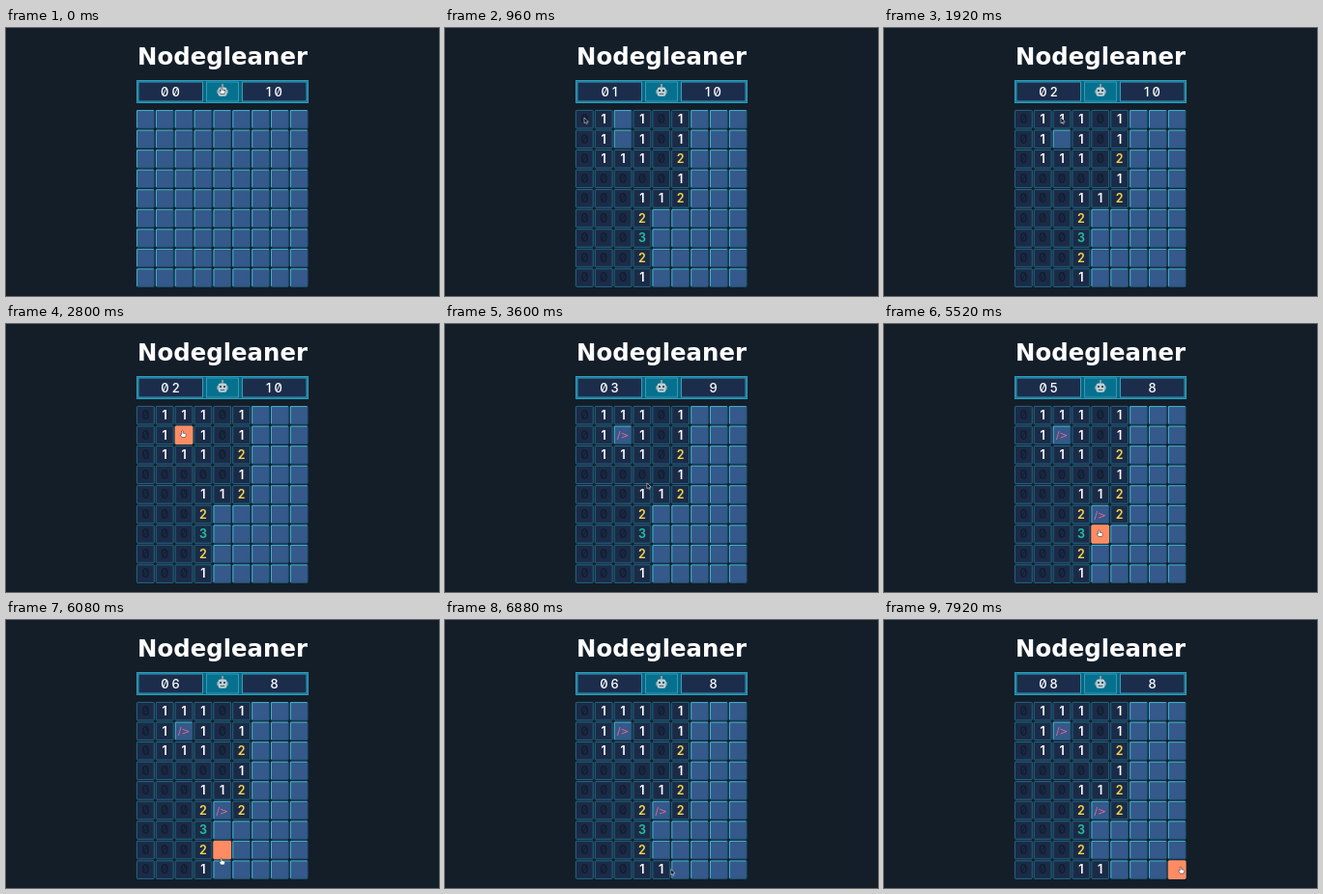
These frames come from a looping animation (448x278 px, 8000 ms). An HTML page:

```html
<!DOCTYPE html>
<html lang="en">
<head>
<meta charset="utf-8">
<title>Nodegleaner</title>
<style>
  html, body { margin: 0; width: 100%; height: 100%; overflow: hidden; background: #131e29; }
  svg { display: block; width: 100vw; height: 100vh; }
  text { text-anchor: middle; font-family: Inter, sans-serif; font-feature-settings: "zero" 1; }
  .title { font: 700 24.4px "DejaVu Sans", sans-serif; fill: #fff; }
  .count { font-size: 13px; font-weight: 500; letter-spacing: 3px; fill: #fff; }
  .num { font-size: 12.5px; font-weight: 600; }
  .flag { font: 10.5px "DejaVu Sans", sans-serif; fill: #f0648c; }
</style>
</head>
<body>
<svg id="stage" viewBox="0 0 448 278">
  <rect width="448" height="278" fill="#131e29"/>
  <text class="title" x="224" y="38">Nodegleaner</text>

  <rect x="135.5" y="54.5" width="177" height="23" fill="#0b6580" stroke="#2b9dbc"/>
  <g fill="#1c2d4c" stroke="#38a9c7" stroke-width=".9">
    <rect x="137" y="56" width="66.5" height="20"/>
    <rect x="244.5" y="56" width="66.5" height="20"/>
    <rect x="207.5" y="56" width="33" height="20" fill="#06718e" stroke="#35a2bf"/>
  </g>
  <text class="count" id="clock" x="171.5" y="70.5"></text>
  <text class="count" id="left" x="279" y="70.5"></text>

  <g id="robot">
    <path d="M224 58.5V62" stroke="#b9cdd3" stroke-width="1"/>
    <circle cx="224" cy="59" r="1" fill="#d98b83"/>
    <rect x="218" y="64" width="12" height="4" rx="1.2" fill="#7d9aa6"/>
    <rect x="219.5" y="61.5" width="9" height="9.3" rx="2.4" fill="#c0d0d5"/>
    <circle cx="222" cy="65" r="1.1" fill="#1d3c4b"/>
    <circle cx="226" cy="65" r="1.1" fill="#1d3c4b"/>
    <path d="M221.8 68.4H226.2" stroke="#405f6c" stroke-width="1"/>
  </g>

  <g id="board"></g>

  <g id="cursor">
    <path id="arrow" d="M0 0V5.8L1.4 4.7 2.4 6.6 3.3 6.1 2.5 4.3 4.3 4.1Z"
          fill="#0a0d12" stroke="#e4e8ec" stroke-width=".55"/>
    <path id="hand" d="M-.8 0Q0-1 .7 0V2.2L3.2 2.8Q4 3.2 3.7 4.4L3 6.5H-.6L-2.4 3.8Q-2 2.8-.8 3.7Z"
          fill="#fff" stroke="#25303b" stroke-width=".55"/>
  </g>
</svg>
<script>
const LOOP = 8000, FIRST = 640;
const X0 = 135, Y0 = 85, STEP_X = 19.85, STEP_Y = 20.55, W = 18.7, H = 19.4;
const INK = { 0: '#121e30', 1: '#fff', 2: '#f4d54a', 3: '#22c3a2' };

const field = [
  '011101...', '01.101...', '011102...', '000001...', '000112...',
  '0002.2...', '0003.....', '0002.....', '00011....'
];
// Cells opened or flagged after the first click, keyed by column and row.
const lateOpen = { '2,0': 1900, '2,1': Infinity, '5,5': 4800, '4,8': 6480 };
const flagged = { '2,1': 3040, '4,5': 4040 };

// Pointer stops: arrive, leave, x, y
const stops = [
  [0, 120, 223, 62], [560, 1260, 144, 93], [1640, 2080, 183, 93],
  [2440, 3240, 182.5, 111], [3840, 4160, 223, 194], [4400, 4420, 233.7, 195],
  [4640, 4960, 243, 196], [5360, 5720, 222.5, 214], [6240, 6640, 223, 257],
  [6880, 6920, 233.7, 258.5], [7560, LOOP, 307, 256.5]
];

const $ = id => document.getElementById(id);
const board = $('board');

function add(parent, tag, attrs) {
  const node = document.createElementNS('http://www.w3.org/2000/svg', tag);
  for (const key in attrs) node.setAttribute(key, attrs[key]);
  return parent.appendChild(node);
}

function makeCell(col, row) {
  const x = X0 + col * STEP_X, y = Y0 + row * STEP_Y;
  const key = col + ',' + row, value = field[row][col];
  const mid = x + W / 2, base = y + 14;
  const box = add(board, 'rect', {
    x: x + .4, y: y + .4, width: W - .8, height: H - .8, rx: .8, 'stroke-width': .9
  });
  const edge = add(board, 'path', {
    d: `M${x + .6} ${y + H - 1}V${y + .6}H${x + W - .8}`,
    fill: 'none', stroke: '#45b2d0', 'stroke-width': 1
  });
  const num = add(board, 'text', { class: 'num', x: mid, y: base, fill: INK[value] || 'none' });
  num.textContent = value === '.' ? '' : value;
  const flag = add(board, 'text', { class: 'flag', x: mid, y: base - .2 });
  flag.textContent = '/>';
  return {
    x, y, box, edge, num, flag,
    openAt: value === '.' ? Infinity : lateOpen[key] || FIRST,
    flagAt: flagged[key] || Infinity
  };
}

const cells = [];
for (let row = 0; row < 9; row++)
  for (let col = 0; col < 9; col++) cells.push(makeCell(col, row));

const ease = p => p * p * (3 - 2 * p);
const show = (node, on) => node.setAttribute('visibility', on ? 'visible' : 'hidden');

function pointer(t) {
  let i = stops.length - 1;
  while (stops[i][0] > t) i--;
  const [, leave, x, y] = stops[i], next = stops[i + 1];
  if (t <= leave || !next) return [x, y];
  const p = ease((t - leave) / (next[0] - leave));
  return [x + (next[2] - x) * p, y + (next[3] - y) * p];
}

function draw(t) {
  const [px, py] = pointer(t);
  let overButton = px > 207 && px < 241 && py > 55 && py < 77;
  let flags = 0;

  for (const c of cells) {
    const open = t >= c.openAt, marked = t >= c.flagAt;
    const hot = !open && px >= c.x && px <= c.x + W && py >= c.y && py <= c.y + H;
    if (hot) overButton = true;
    if (marked) flags++;
    c.box.setAttribute('fill', hot ? '#ff8b62' : open ? '#1b2b47' : '#34598a');
    c.box.setAttribute('stroke', hot ? '#ff9b75' : open ? '#23708f' : '#1d5475');
    show(c.edge, !open && !hot);
    show(c.num, open);
    show(c.flag, marked);
  }

  const seconds = Math.max(0, Math.floor((t - 920) / 1000) + 1);
  $('clock').textContent = String(seconds).padStart(2, '0');
  $('left').textContent = 10 - flags;
  $('cursor').setAttribute('transform', `translate(${px} ${py})`);
  show($('hand'), overButton);
  show($('arrow'), !overButton);
}

const start = performance.now();
function tick() {
  draw((performance.now() - start) % LOOP);
  requestAnimationFrame(tick);
}
tick();
</script>
</body>
</html>
```
